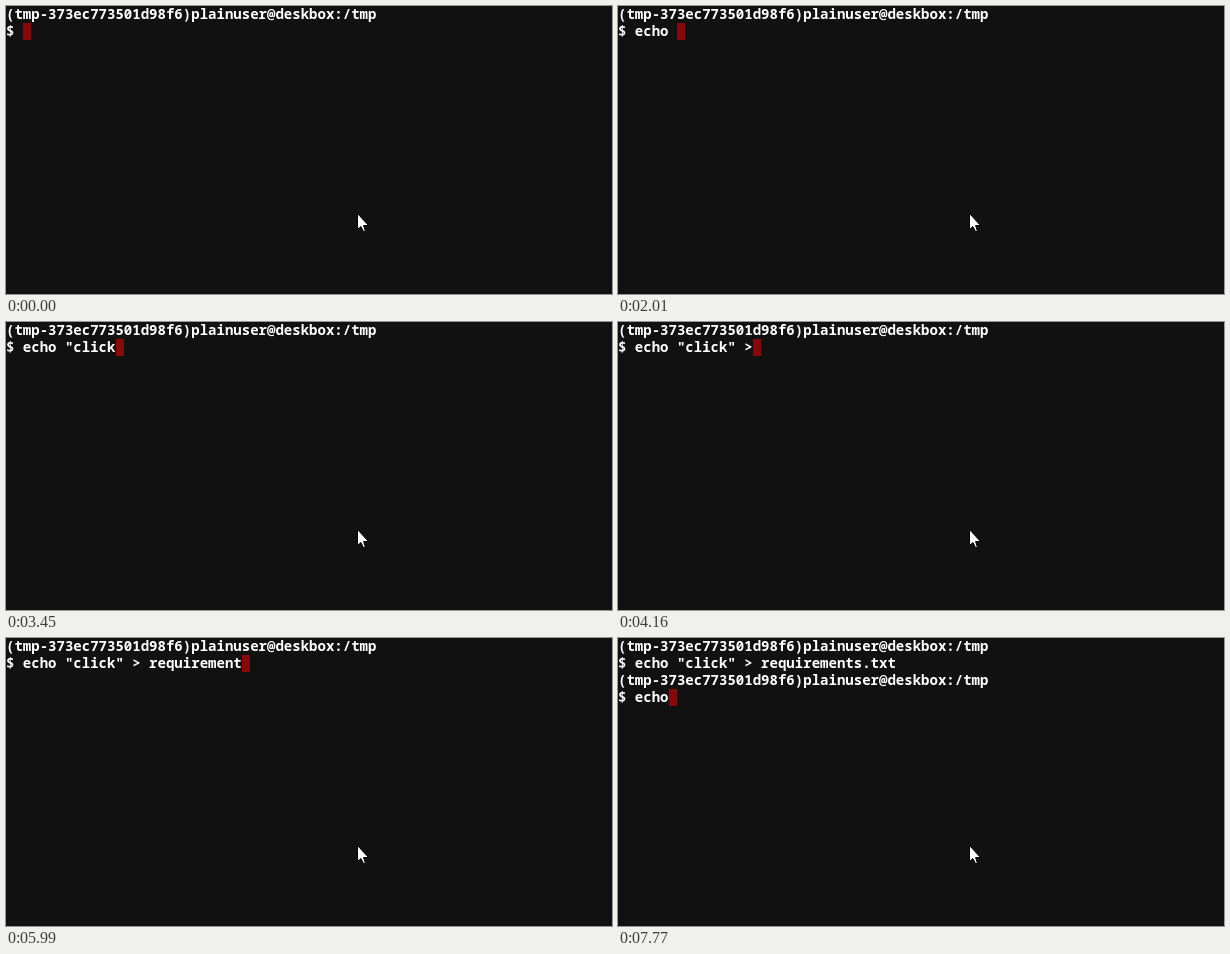
An HTML page that plays this animation: 606x288 px, repeating every 8 s.

```html
<!DOCTYPE html>
<html lang="en">
<head>
<meta charset="utf-8">
<title>Terminal</title>
<style>
  html, body { margin: 0; width: 100%; height: 100%; overflow: hidden; background: #111; }
  svg { display: block; }
  text {
    font: 600 14.04px "Noto Sans Mono", "DejaVu Sans Mono", monospace;
    fill: #fff;
    white-space: pre;
  }
</style>
</head>
<body>
<svg width="606" height="288" viewBox="0 0 606 288">
  <rect width="606" height="288" fill="#111"/>
  <rect id="cursor" height="17" fill="#880808"/>
  <g id="lines"></g>
  <path d="M351.5 207.5V223.5L354.9 220.5L357.5 225.5H359.5L357.6 219.5H362.5Z" fill="#fff" stroke="#000"/>
</svg>
<script>
  const LOOP = 8000, CELL = 8.426, ROW = 17, BASELINE = 13;
  const PROMPT = "(tmp-373ec773501d98f6)plainuser@deskbox:/tmp\n$ ";

  // Each burst is typed at an even pace: first key at start, last key at end.
  const bursts = [
    { text: "echo", start: 1430, end: 1730 },
    { text: " ", start: 2010 },
    { text: '"click', start: 2820, end: 3450 },
    { text: '"', start: 3760 },
    { text: " > ", start: 4040, end: 4280 },
    { text: "requirement", start: 5180, end: 5930 },
    { text: "s.t", start: 6140, end: 6270 },
    { text: "xt", start: 6550, end: 6820 },
    { text: "\n", start: 6940 },
    { text: "echo", start: 7500, end: 7770 }
  ];

  const cursor = document.getElementById("cursor");
  const lines = Array.from({ length: 4 }, (_, row) => {
    const line = document.createElementNS("http://www.w3.org/2000/svg", "text");
    line.setAttribute("y", row * ROW + BASELINE);
    return document.getElementById("lines").appendChild(line);
  });

  function typedPart({ text, start, end = start }, time) {
    if (time < start) return "";
    if (time >= end) return text;
    const pace = (end - start) / (text.length - 1);
    return text.slice(0, 1 + Math.floor((time - start) / pace));
  }

  function moveCursor(column, row) {
    const left = Math.round(column * CELL);
    cursor.setAttribute("x", left);
    cursor.setAttribute("y", row * ROW);
    cursor.setAttribute("width", Math.round((column + 1) * CELL) - left);
  }

  function render(time) {
    const typed = bursts.map(burst => typedPart(burst, time)).join("");
    const rows = (PROMPT + typed.replace("\n", "\n" + PROMPT)).split("\n");
    lines.forEach((line, row) => {
      const content = rows[row] ?? "";
      if (line.textContent !== content) line.textContent = content;
    });
    moveCursor(rows.at(-1).length, rows.length - 1);
  }

  function tick(now) {
    render(now % LOOP);
    requestAnimationFrame(tick);
  }

  render(0);
  requestAnimationFrame(tick);
</script>
</body>
</html>
```
